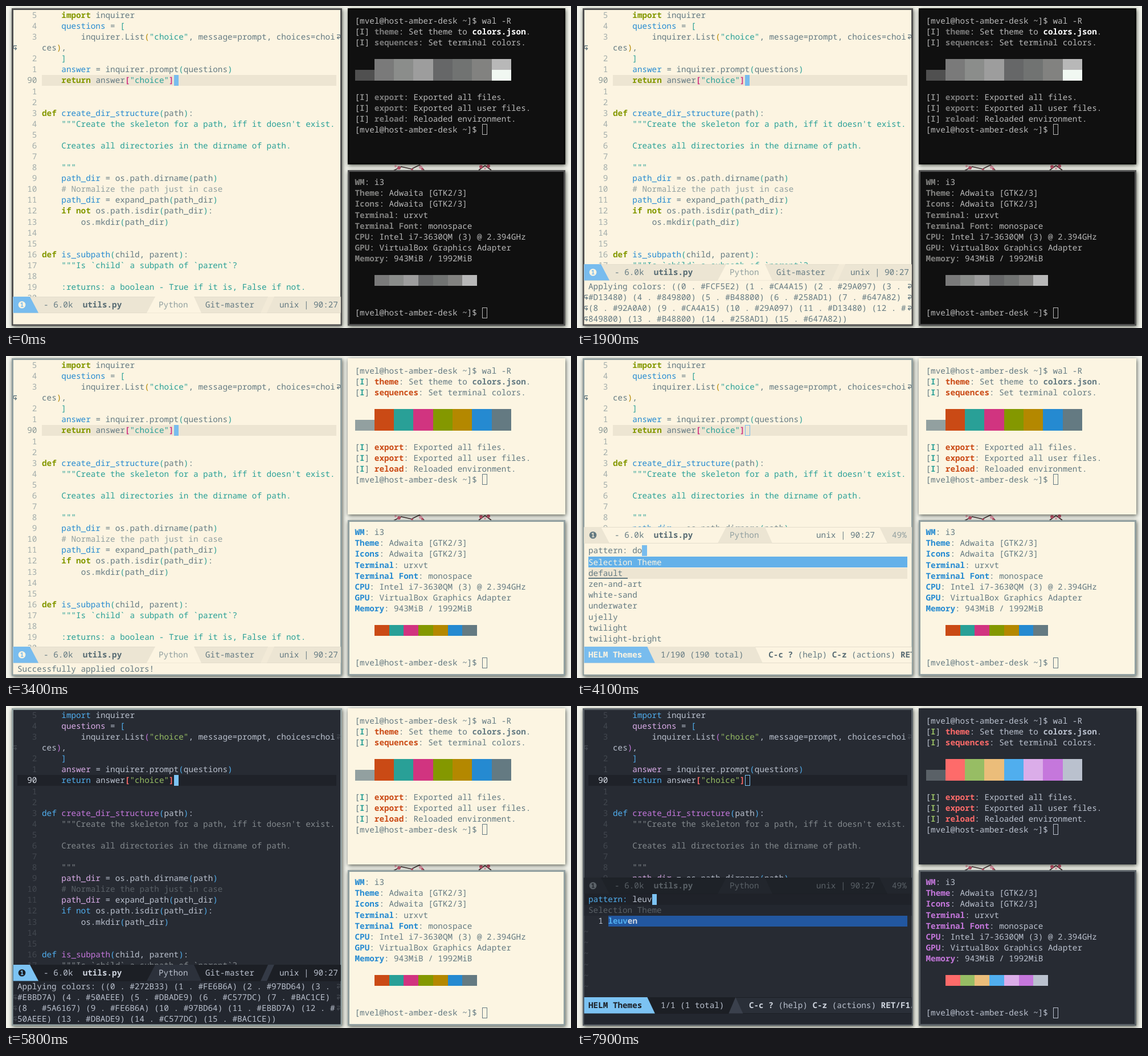
An HTML page that plays this animation: 992x565 px, repeating every 8 s.

```html
<!DOCTYPE html>
<html lang="en">
<head>
<meta charset="utf-8">
<title>Editor theme to terminal colors</title>
<style>
html, body { margin: 0; width: 100%; height: 100%; overflow: hidden; background: #f3f4ec; }
svg { display: block; width: 992px; height: 565px; }
text { font: 14.3px "Noto Sans Mono", "DejaVu Sans Mono", monospace; text-rendering: geometricPrecision; }
rect { shape-rendering: crispEdges; }
.b { font-weight: 700; }
.shadow { filter: drop-shadow(1px 2px 3.5px rgba(20, 25, 15, .7)); }
</style>
</head>
<body>
<svg id="stage" viewBox="0 0 992 565"></svg>
<script>
const LOOP = 8000, CW = 8.58, LH = 19.08;
const stage = document.getElementById('stage');

// Terminal palettes: background, six hues, foreground, bright black, bright white
const PAL = [
  ['#101010', '#7a7a7a', '#8b8d8b', '#9d9d9d', '#666768', '#717372', '#828280', '#b8b8b8', '#505050', '#f1f8f2'],
  ['#FCF5E2', '#CA4A15', '#29A097', '#D13480', '#849800', '#B48800', '#258AD1', '#647A82', '#92A0A0', '#647A82'],
  ['#272B33', '#FE6B6A', '#97BD64', '#EBBD7A', '#50AEEE', '#DBADE9', '#C577DC', '#BAC1CE', '#5A6167', '#BAC1CE']
];
const BORDERS = [['#505050', '#080808'], ['#92A0A0', '#FCF5E2'], ['#5A6167', '#272B33']];
const EDITOR = [10, 4, 580, 557], TOP = [600, 4, 382, 274], LOW = [600, 288, 382, 273];

// A leading * means bold
const THEMES = {
  light: {
    bg: '#fcf4e1', mini: '#fcf4e1', hl: '#ede5d2', hlX: 63, accent: '#78bcee', num: '#a3adab', cur: '#8b9896', fringe: '#647A82',
    ink: { _: '#647A82', k: '*#849800', f: '#258AD1', v: '#258AD1', s: '#29A097', d: '#29A097', c: '#92A0A0', 1: '#29A097', 2: '#B48800', m: '*#D13480', b: '*#566a72', p: '#647A82', g: '#92A0A0', h: '*#258AD1', w: '*#fcf4e1' },
    bar: '#ece5d3', rim: '#e4ddcc', tab: '#fcf4e1', slash: '#f2ead7', dot: '#fcf4e1', dimBar: '#fcf4e1', dimTab: '#ece5d3', dimDot: '#647A82', dimInk: null, help: '#fcf4e1'
  },
  dark: {
    bg: '#272B33', mini: '#23272f', hl: '#1f2229', hlX: 20, accent: '#7cc3f3', num: '#42474f', cur: '#d8dde6', fringe: '#42474f',
    ink: { _: '#BAC1CE', k: '#50AEEE', f: '#C577DC', v: '#DBADE9', s: '#97BD64', d: '#83898d', c: '#5A6167', 1: '#50AEEE', 2: '#C577DC', m: '*#FE6B6A', b: '*#d0d6e0', p: '#50AEEE', g: '#BAC1CE', h: '*#50AEEE', w: '*#1b1f25' },
    bar: '#1c1f25', rim: '#1c1f25', tab: '#2c313b', slash: '#343a46', dot: '#1b1f25', dimBar: '#1e2228', dimTab: '#22262d', dimDot: '#5A6167', dimInk: '#5A6167', help: '#2a2f38'
  }
};

const CODE = `5|    {k import} inquirer
4|    {v questions} = {1 [}
3|        inquirer.List{2 (}{s "choice"}, message=prompt, choices=choi
|ces{2 )},
2|    {1 ]}
1|    {v answer} = inquirer.prompt{1 (}questions{1 )}
90|    {k return} answer{m [}{s "choice"}{m ]}
1|
2|
3|{k def} {f create_dir_structure}{1 (}path{1 )}:
4|    {d """Create the skeleton for a path, iff it doesn't exist.}
5|
6|    {d Creates all directories in the dirname of path.}
7|
8|    {d """}
9|    {v path_dir} = os.path.dirname{1 (}path{1 )}
10|    {c # Normalize the path just in case}
11|    {v path_dir} = expand_path{1 (}path_dir{1 )}
12|    {k if} {k not} os.path.isdir{1 (}path_dir{1 )}:
13|        os.mkdir{1 (}path_dir{1 )}
14|
15|
16|{k def} {f is_subpath}{1 (}child, parent{1 )}:
17|    {d """Is \`child\` a subpath of \`parent\`?}
18|
19|    {d :returns: a boolean - True if it is, False if not.}
20|`.split('\n').map(row => row.split('|'));

const PROMPT = '[mvel@host-amber-desk ~]$ ';
const TOP_TERM = [PROMPT + 'wal -R', '[{g I}] {t theme}: Set theme to {b colors.json}.',
  '[{g I}] {t sequences}: Set terminal colors.', '', '', '', '', '[{g I}] {t export}: Exported all files.',
  '[{g I}] {t export}: Exported all user files.', '[{g I}] {t reload}: Reloaded environment.', PROMPT];
const LOW_TERM = ['{l WM}: i3', '{l Theme}: Adwaita [GTK2/3]', '{l Icons}: Adwaita [GTK2/3]', '{l Terminal}: urxvt',
  '{l Terminal Font}: monospace', '{l CPU}: Intel i7-3630QM (3) @ 2.394GHz', '{l GPU}: VirtualBox Graphics Adapter',
  '{l Memory}: 943MiB / 1992MiB', '', '', '', '', PROMPT];

const THEME_LIST = ['default', 'zen-and-art', 'white-sand', 'underwater', 'ujelly', 'twilight', 'twilight-bright'];
const MENUS = {
  mx: { title: 'HELM M-x', prompt: 'M-x', head: 'Emacs Commands', text: 'theme-magic', total: 5210, from: 500, pace: 72,
    items: ['helm-themes', 'save-buffer', 'eval-buffer', 'find-file', 'magit-status', 'describe-face', 'load-theme'], hit: ['theme-magic-from-theme'], filter: 1400 },
  doom: { title: 'HELM Themes', prompt: 'pattern:', head: 'Selection Theme', text: 'doom-one', total: 190, from: 3900, pace: 100,
    items: THEME_LIST, hit: ['doom-one', 'doom-one-light'], filter: 4700 },
  leuven: { title: 'HELM Themes', prompt: 'pattern:', head: 'Selection Theme', text: 'leuv', total: 190, from: 7500, pace: 100,
    items: THEME_LIST, hit: ['leuven'], filter: 7900 }
};

const STEPS = [
  [0, { theme: 'light', term: 0, edge: 0, msg: '', menu: '' }],
  [500, { menu: 'mx' }],
  [1700, { menu: '', msg: 'apply' }],
  [2200, { term: 1 }],
  [2400, { msg: 'done' }],
  [2600, { edge: 1 }],
  [3800, { menu: 'doom', msg: '' }],
  [5800, { theme: 'dark', menu: '', msg: 'apply' }],
  [6100, { term: 2 }],
  [6400, { msg: 'done' }],
  [6700, { edge: 2 }],
  [7500, { menu: 'leuven', msg: '' }]
];

const rect = (x, y, w, h, fill, more = '') => `<rect x="${x}" y="${y}" width="${w}" height="${h}" fill="${fill}" ${more}/>`;
const hollow = (x, y, color) => rect(x + .5, y + .5, CW - .6, LH - 1, 'none', `stroke="${color}"`);

// One row of monospace text; {x word} picks ink x
function line(x, top, src, ink) {
  let col = 0, out = '';
  for (const part of src.split(/(\{\w [^}]*\})/)) {
    const tag = /^\{(\w) (.*)\}$/.exec(part);
    const raw = tag ? tag[2] : part, word = raw.trim();
    const color = ink[tag ? tag[1] : '_'];
    if (word) {
      const at = x + (col + raw.length - raw.trimStart().length) * CW;
      out += `<text x="${at.toFixed(2)}" y="${(top + 14.5).toFixed(2)}" fill="${color.replace('*', '')}"${color[0] === '*' ? ' class="b"' : ''}>${word}</text>`;
    }
    col += raw.length;
  }
  return out;
}

// Slanted bar piece: left edge top/bottom, right edge top/bottom
const piece = (y, a, b, c, d, fill) => `<polygon points="${a},${y} ${c},${y} ${d},${y + 28.5} ${b},${y + 28.5}" fill="${fill}"/>`;

// Bar background with thin lines above and below
const barBase = (y, fill, rim) => rect(12, y, 576, 29, rim) + rect(12, y + 1, 576, 27, fill);

function wrapMark(top, left, color) {
  const put = left ? `translate(19 ${top + 5})scale(-1 1)` : `translate(581 ${top + 5})`;
  return `<path transform="${put}" d="M0 1h4q2 0 2 2.5t-2 2.5h-3M3 3.5l-2.5 2.5 2.5 2.5" fill="none" stroke="${color}" stroke-width="1.3"/>`;
}

const frameBox = ([x, y, w, h], border, bg) => rect(x, y, w, h, border) + rect(x + 3, y + 3, w - 6, h - 6, bg);

function wallpaper() {
  let out = rect(0, 0, 992, 565, '#f3f4ec');
  out += '<path d="M678 290l16-8 18 4 14-7 8 9M830 288l11-8 11 8" fill="none" stroke="#3c2b2b" stroke-width="1.6"/>';
  [684, 690, 713, 728, 731, 834, 841, 847].forEach((x, i) => {
    out += `<circle cx="${x}" cy="${281 + i * 3 % 7}" r="${2 + i % 2}" fill="${i % 3 ? '#c9556f' : '#e9a3b3'}"/>`;
  });
  return out + [EDITOR, TOP, LOW].map(box => rect(...box, '#505050', 'class="shadow"')).join('');
}

function terminals(s) {
  const p = PAL[s.term], [edge, focus] = BORDERS[s.edge];
  const ink = { _: p[7], g: '*' + p[2], t: '*' + p[1], l: '*' + p[6], b: '*' + (s.term ? p[7] : '#ffffff') };
  const x = 612.5, y1 = 16.5, y2 = 299.8;
  let out = frameBox(TOP, focus, p[0]) + frameBox(LOW, edge, p[0]);
  TOP_TERM.forEach((row, i) => out += line(x, y1 + i * LH, row, ink));
  LOW_TERM.forEach((row, i) => out += line(x, y2 + i * LH, row, ink));
  out += rect(x, y1 + 5 * LH, 4 * CW, LH, p[8]);
  for (let i = 1; i < 8; i++) {
    out += rect(x + 4 * i * CW, y1 + 4 * LH, 4 * CW, 2 * LH, p[i]);
    out += rect(x + (1 + 3 * i) * CW, y2 + 9 * LH, 3 * CW, LH, p[i]);
  }
  out += rect(x + 28 * CW, y1 + 5 * LH, 4 * CW, LH, p[9]);
  const cx = x + PROMPT.length * CW;
  return out + hollow(cx, y1 + 10 * LH, p[7]) + hollow(cx, y2 + 12 * LH, p[7]);
}

function modeline(y, t, active) {
  const dim = t.dimInk, ink = active || !dim ? t.ink : { _: dim, b: '*' + dim, g: dim };
  const text = (x, src) => line(x, y + 4.6, src, ink);
  const tab = active ? t.tab : t.dimTab, badge = active ? t.accent : tab;
  let out = barBase(y, active ? t.bar : t.dimBar, t.rim);
  out += piece(y, 12, 12, 42, 57, badge) + piece(y, 262, 247, 330, 343, tab);
  out += `<circle cx="28" cy="${y + 14.3}" r="6.3" fill="${active ? t.dot : t.dimDot}"/>`;
  out += `<text x="28" y="${y + 18.3}" text-anchor="middle" class="b" style="font-size:11px" fill="${badge}">1</text>`;
  out += text(66, '- 6.0k  {b utils.py}') + text(268, '{g Python}');
  if (active) return out + piece(y, 460, 447, 471, 458, t.slash) + text(350, 'Git-master') + text(480, 'unix | 90:27');
  return out + piece(y, 531, 545, 588, 588, tab) + text(420, 'unix | 90:27') + text(553, '{g 49%}');
}

function menuPane(s, t) {
  const m = MENUS[s.menu], dark = s.theme === 'dark', ink = t.ink;
  const top = dark ? 329.5 : 331.5, headY = dark ? 348.6 : 352.3, listY = dark ? 367.7 : 371.7;
  const items = s.hits ? m.hit : m.items, n = s.hits ? m.hit.length : m.total;
  let out = rect(12, 328, 576, 231, t.bg) + modeline(dark ? 301 : 300, t, false);
  if (dark) out += rect(12, top, 576, LH, t.hl) + rect(12, headY, 576, LH, t.mini);
  else out += rect(20, headY, 560, LH, '#64b1e9');
  const typed = m.text.slice(0, s.typed);
  out += line(20, top, `{p ${m.prompt}} ${typed}`, ink);
  out += rect(20 + (m.prompt.length + 1 + typed.length) * CW, top, CW, LH, t.accent);
  out += line(20, headY, m.head, { _: dark ? '#5A6167' : '#fcf4e1' });
  const x = dark ? 54.5 : 20;
  items.forEach((name, i) => {
    const y = listY + i * LH;
    if (!i) {
      out += rect(x, y, 580 - x, LH, dark ? '#2257a0' : t.hl);
      if (!dark) out += rect(20, y + LH - 1.3, (name.length + 1) * CW, 1.2, ink._);
    }
    if (dark) out += line(20, y, `  ${i + 1}`, { _: i ? t.num : ink._ });
    const src = s.hits ? `{h ${m.text}}{b ${name.slice(m.text.length)}}` : name;
    out += line(x, y, src, ink);
  });
  if (dark) for (let i = items.length; i < 7; i++) out += line(12, listY + i * LH, '~', { _: t.num });
  const y = dark ? 511 : 510, end = 20 + m.title.length * CW;
  const count = `1/${n} (${n} total)`, stop = end + 32.5 + count.length * CW;
  out += barBase(y, t.help, t.rim) + piece(y, 12, 12, stop + 20, dark ? stop + 8 : stop + 33, t.bar);
  if (dark) out += piece(y, stop + 20, stop + 8, stop + 20, stop + 33, '#3a404c');
  out += piece(y, 12, 12, end + 9, end + 22.5, t.accent) + line(20, y + 4.6, `{w ${m.title}}`, ink);
  out += line(end + 32.5, y + 4.6, count, ink);
  return out + line(stop + 43.5, y + 4.6, '{b C-c ?} (help) {b C-z} (actions) {b RET/F1/F2}', ink) + rect(12, y + 29, 576, 22, t.mini);
}

function applied(p) {
  const pairs = Array.from({ length: 16 }, (_, i) => `(${i} . ${p[i < 9 ? i : i - 8]})`);
  return `Applying colors: (${pairs.join(' ')})`.match(/.{1,65}/g);
}

function editor(s) {
  const t = THEMES[s.theme], dark = s.theme === 'dark', y0 = 6.5;
  let out = frameBox(EDITOR, BORDERS[s.edge][0], t.bg) + '<g clip-path="url(#pane)">';
  const now = y0 + 6 * LH, cx = 63 + 27 * CW;
  out += rect(t.hlX, now, 580 - t.hlX, LH, t.hl);
  CODE.forEach(([num, src], i) => {
    const y = y0 + i * LH;
    out += line(20, y, num.padStart(4), { _: i === 6 ? t.cur : t.num }) + line(63, y, src, t.ink);
  });
  out += wrapMark(y0 + 2 * LH, false, t.fringe) + wrapMark(y0 + 3 * LH, true, t.fringe);
  out += s.menu ? hollow(cx, now, t.accent) : rect(cx, now, CW, LH, t.accent);
  if (s.menu) return out + menuPane(s, t) + '</g>';
  const rows = s.msg === 'apply' ? applied(PAL[dark ? 2 : 1]) : [s.msg ? 'Successfully applied colors!' : ''];
  const bar = (rows.length > 1 ? 453 : 510) + (dark ? 1 : 0), first = 558.7 - rows.length * LH;
  out += rect(12, bar, 576, 560 - bar, t.mini) + modeline(bar, t, true);
  rows.forEach((row, i) => {
    const y = first + i * LH;
    out += line(20, y, row, t.ink);
    if (i) out += wrapMark(y, true, t.fringe);
    if (i < rows.length - 1) out += wrapMark(y, false, t.fringe);
  });
  return out + '</g>';
}

function stateAt(t) {
  const s = Object.assign({}, ...STEPS.filter(([at]) => at <= t).map(([, set]) => set));
  const m = MENUS[s.menu];
  if (m) {
    s.typed = Math.max(0, Math.min(m.text.length, Math.floor((t - m.from) / m.pace)));
    s.hits = t >= m.filter;
  }
  return s;
}

const start = performance.now();
let shown = '';
function draw() {
  const s = stateAt((performance.now() - start) % LOOP), key = JSON.stringify(s);
  if (key !== shown) {
    shown = key;
    stage.innerHTML = '<clipPath id="pane"><rect x="12.5" y="6.5" width="575" height="552"/></clipPath>' +
      wallpaper() + terminals(s) + editor(s);
  }
  requestAnimationFrame(draw);
}
draw();
</script>
</body>
</html>
```
